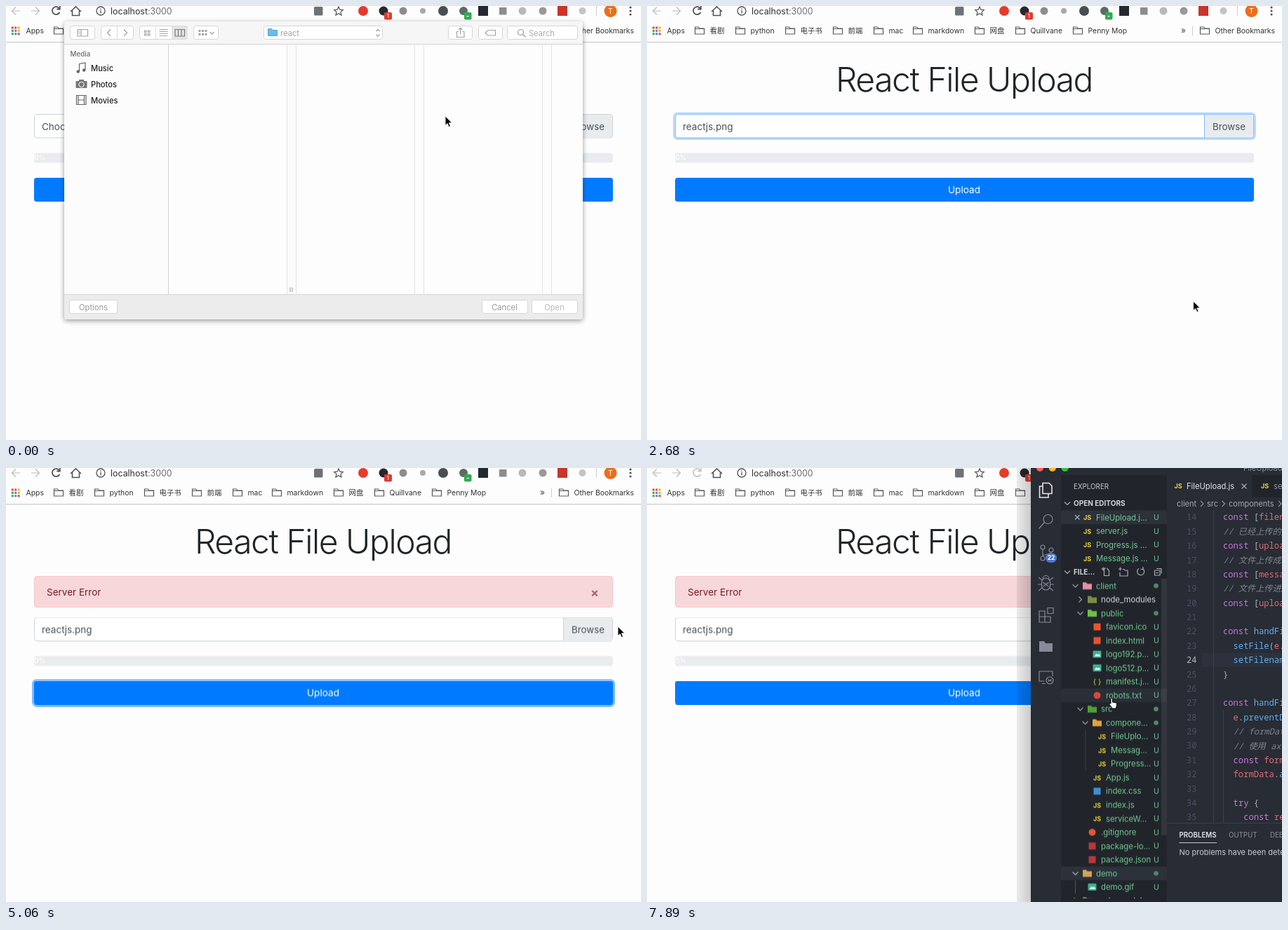
Animation of 905x619 px, one loop 8 s. Source, as an HTML page:

```html
<!DOCTYPE html>
<html lang="en">
<head>
<meta charset="utf-8">
<title>React File Upload</title>
<style>
html, body { margin: 0; width: 100%; height: 100%; overflow: hidden; background: #fdfdfd; }
svg { display: block; width: 100%; height: 100%; font-family: Inter, "Noto Sans CJK SC", "Noto Sans CJK", sans-serif; }
text { white-space: pre; }
.line { fill: none; stroke: currentColor; stroke-width: 1.2; }
.code { font-family: "Noto Sans Mono", "Noto Sans CJK SC", monospace; }
</style>
</head>
<body>
<svg viewBox="0 0 905 619" xmlns="http://www.w3.org/2000/svg"></svg>
<script>
const LOOP = 8000;
let css = '', count = 0;

// Timeline helpers: each returns a class attribute with its own stepped keyframes.
const track = frames => {
  const name = 'k' + count++;
  const body = frames.map(([t, rule]) => `${t / LOOP * 100}%{${rule}}`).join('');
  css += `@keyframes ${name}{${body}}.${name}{animation:${name} ${LOOP}ms step-end infinite}`;
  return `class="${name}"`;
};
const show = (...spans) => track([[0, 'opacity:0'],
  ...spans.flatMap(([a, b]) => b < LOOP ? [[a, 'opacity:1'], [b, 'opacity:0']] : [[a, 'opacity:1']])]);
const move = points => track(points.map(([t, x, y]) => [t, `transform:translate(${x}px,${y}px)`]));
const leg = (t0, t1, n, [x0, y0], [x1, y1]) => Array.from({ length: n }, (_, i) => {
  const u = (i + 1) / n, e = u * u * (3 - 2 * u);
  return [t0 + (t1 - t0) * i / (n - 1), x0 + (x1 - x0) * e, y0 + (y1 - y0) * e];
});

// Drawing helpers: text is placed by the middle of its capitals.
const g = (attr, ...kids) => `<g ${attr}>${kids.flat(9).join('')}</g>`;
const box = (x, y, w, h, fill, extra = '') => `<rect x="${x}" y="${y}" width="${w}" height="${h}" fill="${fill}" ${extra}/>`;
const dot = (x, y, r, fill, extra = '') => `<circle cx="${x}" cy="${y}" r="${r}" fill="${fill}" ${extra}/>`;
const line = (d, extra = '') => `<path class="line" d="${d}" ${extra}/>`;
const shape = (d, fill, extra = '') => `<path d="${d}" fill="${fill}" ${extra}/>`;
const text = (x, y, s, size, fill, extra = '') => `<text x="${x}" y="${y + size * .364}" font-size="${size}" fill="${fill}" ${extra}>${s}</text>`;
const MID = 'text-anchor="middle"', END = 'text-anchor="end"';
const MEDIUM = 'font-weight="500"', SEMI = 'font-weight="600"', BOLD = 'font-weight="700"';
const color = c => `color="${c}"`;
const folderPath = (x, y) => `M${x - 6.5} ${y - 5}h5l1.5 2h6.5v8h-13z`;

/* ---------- browser ---------- */
function browser() {
  const reload = 'M76 3.5A5.5 5.5 0 1 0 76.4 9M76.8 0v4.5h-4.5';
  const extensions = [[509, '#e53b2c', 7], [538, '#26282b', 6.5], [566, '#8c8c8c', 5.5], [594, '#a9a9a9', 4],
    [623, '#4a4d52', 7], [652, '#5a6c68', 6], [736, '#b9b9b9', 5.5], [765, '#999', 5.5], [821.5, '#c4c4c4', 5]];
  const marks = [[75, '看剧'], [133, 'python'], [204, '电子书'], [272, '前端'], [330, 'mac'], [386, 'markdown'],
    [474, '网盘'], [532, 'Quillvane'], [614, 'Penny Mop'], [795, 'Other Bookmarks']];
  const apps = ['#e5483a', '#e5483a', '#f2b01e', '#3aa757', '#4a86e8', '#f2b01e', '#3aa757', '#4a86e8', '#e5483a'];
  return [
    box(0, 0, 905, 619, '#fdfdfd'),
    box(0, 51, 905, 1.3, '#cdcdcd'),
    g(color('#bcbcbc'), line('M20 7H9M14 1.5L8.5 7L14 12.5M36 7h11M42 1.5L47.5 7L42 12.5', 'stroke-width="1.5"')),
    g(show([0, 300], [2680, 5500]), g(color('#505357'), line(reload, 'style="stroke-width:1.8"'))),
    g(show([300, 2680], [5500, LOOP]), g(color('#c6c6c6'), line(reload, 'style="stroke-width:1.8"'))),
    g(color('#505357'),
      line('M92 8L99.5 1L107 8M94.5 6.5V13.5H104.5V6.5', 'style="stroke-width:1.6"'),
      line('M141 7a6 6 0 1 1-12 0a6 6 0 1 1 12 0M135 6v4.5M135 3.5v1.4', 'style="stroke-width:1.3"'),
      line('M474 1l1.9 4.2l4.4.4l-3.3 3l1 4.4l-4-2.3l-4 2.3l1-4.4l-3.3-3l4.4-.4z')),
    `<text x="149" y="11.5" font-size="12.4" fill="#2e3134">localhost<tspan fill="#6b6e72">:3000</tspan></text>`,
    box(439, 1, 12.5, 12.5, '#6d7278', 'rx="1.5"'),
    extensions.map(([x, c, r]) => dot(x, 7, r, c)),
    box(539, 9, 11, 10.5, '#e0392e', 'rx="2"'), text(544.5, 14.3, '1', 8, '#fff', MID),
    box(653, 9, 10.5, 10.5, '#34a853', 'rx="2"'), box(656.5, 14, 3, 1.2, '#fff'),
    box(673, 0, 14, 14, '#24292e'), box(703, 2, 10.5, 10.5, '#8d8d8d'), box(786, 0, 14, 14, '#c7352b'),
    box(841, 0, 1, 14, '#d0d0d0'),
    dot(861.5, 7, 9, '#ef6c1a'), text(861.5, 7.3, 'T', 10.5, '#fff', MID),
    [2, 7, 12].map(y => dot(890, y, 1.6, '#505357')),
    apps.map((c, i) => box(7.8 + i % 3 * 4.4, 29.5 + (i / 3 | 0) * 4.4, 3, 3, c)),
    text(28.5, 35.5, 'Apps', 10.4, '#333'),
    marks.map(([x, s]) => [g(color('#55585c'), line(folderPath(x, 35) + `M${x - 6.5} 32.5h13`)),
      text(x + 14.5, 35.5, s, 10.4, '#333')]),
    text(761, 34.5, '»', 12, '#444'), box(777, 29, 1, 13, '#d0d0d0'),
  ];
}

/* ---------- upload page ---------- */
function page() {
  const ring = (y, h, o) => box(38.5, y, 828, h, 'none', `rx="5" stroke="#007bff" stroke-opacity="${o}" stroke-width="3"`);
  const field = stroke => [
    box(40.5, 154.5, 824, 33.5, '#fff', `rx="3.5" stroke="${stroke}"`),
    shape('M795 155h66a3 3 0 0 1 3 3v26.5a3 3 0 0 1-3 3h-66z', '#e9ecef'),
    box(794, 155, 1, 33, stroke)];
  return [
    text(452, 104.5, 'React File Upload', 48, '#212529', MID + ' font-weight="300" letter-spacing="-1.45"'),
    g(show([4160, LOOP]),
      box(40.5, 154.5, 824, 44, '#f8d7da', 'rx="3.5" stroke="#f5c6cb"'),
      text(58, 177.5, 'Server Error', 13.5, '#721c24'),
      g(color('#a3686f'), line('M835.3 175l7.4 7.4M842.7 175l-7.4 7.4', 'style="stroke-width:2.2"'))),
    g(move([[0, 0, 0], [4160, 0, 58.5]]),
      field('#ced4da'),
      g(show([2680, 4010]), ring(153, 36.5, .25), field('#80bdff')),
      g(show([0, 2680]), text(51, 172, 'Choose File', 13.5, '#495057')),
      g(show([2680, LOOP]), text(51, 172, 'reactjs.png', 13.5, '#495057')),
      text(829.5, 172, 'Browse', 13.3, '#495057', MID),
      box(40, 209.7, 825, 13.7, '#e9ecef', 'rx="3.5"'),
      text(40, 216.5, '0%', 10, '#fff', MEDIUM),
      g(show([4010, 5500]), ring(244, 36.5, .5)),
      box(40, 245, 825, 34, '#007bff', 'rx="3.5"'),
      g(show([3870, 4310]), box(40, 245, 825, 34, '#0069d9', 'rx="3.5"')),
      text(452, 262.5, 'Upload', 13.6, '#fff', MID)),
  ];
}

/* ---------- file dialog ---------- */
const button = (x, y, w, h, fill = '#fff') => box(x + .5, y + .5, w - 1, h - 1, fill, 'rx="3" stroke="#d6d6d6"');

function toolbar(ink, picked, pickedInk) {
  return g(color(ink),
    box(236, 28.5, 23, 19, picked, 'rx="2"'),
    line('M102 33.5h14.5v9.5h-14.5zM107 33.5v9.5M103.5 36h2M103.5 38.5h2'),
    [0, 1, 2, 3].map(i => line(`M${197.5 + i % 2 * 5} ${35 + (i >> 1) * 4.5}h2.5v2.5h-2.5z`)),
    line('M218.5 33.5h12M218.5 36.5h12M218.5 39.5h12M218.5 42.5h12'),
    g(color(pickedInk), line('M241 33.5h13.5v9.5h-13.5zM245.5 33.5v9.5M250 33.5v9.5')),
    [0, 1, 2, 3, 4, 5].map(i => box(274.5 + i % 3 * 4.5, 34 + (i / 3 | 0) * 5, 3, 3, ink)),
    line('M290.5 37l3 3l3-3M527.5 36l2.5-2.5l2.5 2.5M527.5 40.5l2.5 2.5l2.5-2.5', 'style="stroke-width:1.4"'),
    text(391, 38.5, 'react', 11.2, ink),
    line('M645 36.5h-2.5v8h10.5v-8h-2.5M647.7 40.5v-9M645 34l2.7-2.7l2.7 2.7'),
    line('M687 34.5h10.5v7.5h-10.5l-4-3.7z'));
}

const sideIcons = {
  file: 'M102 82h10l2 8v4h-14v-4zM100 90h14M103 85h8M102.5 87.5h9',
  cloud: 'M103 93a3 3 0 0 1-.5-6a4.5 4.5 0 0 1 8.5-1a3.5 3.5 0 0 1 1.5 7z',
  apps: 'M101 94l6.5-12l6.5 12M99.5 90.5h16',
  desk: 'M100 82.5h15v11h-15zM100 85h15',
  docs: 'M100 84h6v10h-6zM105 82h6l3 3v9h-8',
  laptop: 'M101.5 83.5h12v8h-12zM99.5 93.5h16',
};
const sideIcon = (name, y) => g(`transform="translate(0 ${y - 88})" ` + color('#666'), line(sideIcons[name]));

function sidebar() {
  const items = [[88, 'All My Files', 'file'], [111, 'Online Drive', 'cloud'], [134, 'Applications', 'apps'],
    [157.5, 'Desktop', 'desk'], [180.5, 'Documents', 'docs'], [203.5, 'Downloads'],
    [251.5, 'TaoMianLin的M...', 'laptop'], [274.5, 'Remote Disc']];
  const tags = [['红', '#f0544a'], ['橙', '#f5a13c'], ['黄', '#f7cf46'], ['绿', '#65cb4f'], ['蓝', '#34aadc']];
  const head = (y, s) => text(91.5, y, s, 9.8, '#737373', MEDIUM);
  return [
    box(84, 55, 147, 356, '#edeeef'),
    head(68.5, 'Favorites'), head(231.5, 'Devices'), head(303, 'Tags'),
    items.map(([y, s, icon]) => [icon ? sideIcon(icon, y) : '', text(121, y, s, 11.15, '#222', MEDIUM)]),
    dot(107.5, 203.5, 8, '#666'),
    g(color('#fff'), line('M107.5 199v8M104 204l3.5 3.5l3.5-3.5', 'style="stroke-width:1.8"')),
    dot(107.5, 274.5, 7.5, '#c4c4c4', 'stroke="#777"'), dot(107.5, 274.5, 3, '#eee', 'stroke="#777"'),
    tags.map(([s, c], i) => [dot(107.5, 322.5 + i * 23.1, 5.5, c), text(121, 322.5 + i * 23.1, s + '色', 11.3, '#222')]),
    box(221, 58, 7, 239, '#c0c1c2', 'rx="3.5"'),
  ];
}

function mediaList() {
  return [
    box(84, 55, 147, 356, '#fcfcfc'),
    text(91.5, 68.5, 'Media', 9.8, '#6a6a6a', MEDIUM),
    g(color('#666'),
      line('M104.5 93v-10.5l8.5-1.5v10'), dot(102.8, 93.5, 2.2, '#666'), dot(111.2, 91.5, 2.2, '#666'),
      box(99.5, 107, 16, 10, '#777', 'rx="1"'), box(104, 105, 7, 3, '#777'),
      dot(107.5, 112, 3.7, '#777', 'stroke="#fff"'),
      line('M100.5 127.5h13.5v13h-13.5zM103 127.5v13M111.5 127.5v13M103 134h8.5')),
    ['Music', 'Photos', 'Movies'].map((s, i) => text(121, 88.5 + i * 23, s, 11.15, '#222', MEDIUM)),
  ];
}

function preview() {
  const rows = [['', 'Portable Network Graphics image - 30 KB'], ['Created'], ['Modified'], ['Last opened'],
    ['Dimensions', '1200 × 630'], ['', 'Add Tags…']];
  const ink = ['#8f8f8f', '#111', '#111', '#111', '#111', '#1f7df0'];
  return [
    box(414, 55, 407, 356, '#fdfdfd'),
    box(457, 64, 321, 168.5, '#222'), dot(617.5, 147, 42, '#61dafb'),
    text(617.5, 252.5, 'reactjs.png', 14.1, '#111', MID + ' ' + MEDIUM),
    rows.map(([k, v = 'Saturday, 10 August 2019 at 2:10 pm'], i) => {
      const y = 287.5 + i * 15.3;
      return [text(575, y, k, 10.6, '#8a8a8a', END + ' ' + MEDIUM), text(582, y, v, 10.6, ink[i], i ? MEDIUM : SEMI)];
    }),
  ];
}

function dialog() {
  const files = ['download', 'J1Oioug', 'r', 'react_cool', 'react_hooks', 'react_hooks2', 'react_native', 'react', 'reactjs'];
  const thumb = { J1Oioug: '#7d8287', r: '#244a73' };
  const row = (s, i, ink) => [
    box(239.5, 60.5 + i * 16, 9.5, 6.5, thumb[s] || '#222', 'stroke="#b5b5b5"'),
    text(256, 64 + i * 16, s + '.png', 10.6, ink, MEDIUM)];
  const vline = x => box(x, 55, 1, 356, '#e4e4e4');
  const label = (x, s, ink) => text(x, 429.5, s, 11.2, ink, MID);
  const foot = ink => [label(124.5, 'Options', ink), label(710.5, 'Cancel', ink)];
  return g(show([0, 2530]),
    box(83, 22, 739, 425, '#fdfdfd', 'rx="4" style="filter:drop-shadow(0 2px 3.5px rgba(0,0,0,.4))"'),
    box(83, 22, 739, 33, '#f6f6f6', 'rx="4"'), box(83, 54, 739, 1, '#d3d3d3'),
    [[91, 36], [135, 47], [190, 69], [267, 36], [367, 170], [630, 35], [673, 35], [714, 101]].map(([x, w]) => button(x, 28, w, 20)),
    [158, 213, 236].map(x => box(x, 29, 1, 18, '#dcdcdc')),
    g(color('#999'), line('M149 33.5l-4.5 4.7l4.5 4.7M168 33.5l4.5 4.7l-4.5 4.7'),
      line('M737.5 37.5a4 4 0 1 1-8 0a4 4 0 1 1 8 0M736.5 40.5l4 4')),
    text(745, 38.5, 'Search', 11.1, '#aaa'),
    shape(folderPath(380, 37.5) + 'z', '#6bbcec', 'stroke="#4ea5da"'),
    g(show([0, 300]), toolbar('#a3a3a3', '#e4e4e4', '#777')),
    g(show([300, 2530]), toolbar('#4c4c4c', '#6b6b6b', '#fff')),
    box(401, 55, 12, 356, '#fbfbfb'), vline(400), vline(413),
    [582, 595, 764, 777].map(vline),
    box(404.5, 401.5, 1, 6.5, '#999'), box(407.5, 401.5, 1, 6.5, '#999'),
    g(show([0, 150]), mediaList()),
    g(show([150, 2530]), sidebar()),
    box(231, 55, 1, 356, '#d2d2d2'),
    g(show([300, 2530]), files.map((s, i) => row(s, i, '#222'))),
    g(show([1050, 2530]), box(232, 184, 168, 15, '#0464d9'), row('reactjs', 8, '#fff')),
    g(show([1200, 2530]), preview()),
    shape('M83 411h739v32a4 4 0 0 1-4 4h-731a4 4 0 0 1-4-4z', '#ececec'), box(83, 411, 739, 1, '#d6d6d6'),
    button(90, 419, 69, 20), button(678, 419, 66, 20), button(749, 419, 66, 20),
    g(show([0, 300]), foot('#999')), g(show([300, 2530]), foot('#2c2c2c')),
    g(show([0, 1050]), label(781.5, 'Open', '#bbb')),
    g(show([2390, 2530]), button(749, 419, 66, 20, '#e2e2e2')),
    g(show([1050, 2530]), label(781.5, 'Open', '#2c2c2c')));
}

/* ---------- editor ---------- */
const GREEN = '#73c991';
const js = (x, y) => text(x, y + .5, 'JS', 9, '#f0d13a', MID + ' ' + BOLD);
const chevron = (x, y, open) => line(open ? `M${x - 4} ${y - 2}l4 4l4-4` : `M${x - 2} ${y - 4}l4 4l-4 4`);

function fileIcon(kind, x, y) {
  if (kind === 'js') return js(x, y);
  if (kind === '{}') return text(x, y, '{ }', 10, '#f0d13a', MID);
  if (kind === 'img') return box(x - 6, y - 5, 12, 10, '#3fae8f', 'rx="1"') + shape(`M${x - 4} ${y + 3}l3-4l2 2l1.5-2l2.5 4z`, '#e8fff6');
  if (kind[0] === '/') return shape(folderPath(x, y), kind.slice(1));
  return kind[0] === 'o' ? dot(x, y, 5, kind.slice(1)) : box(x - 5, y - 5, 10, 10, kind);
}

function tree() {
  const git = 'o#e2573a', npm = '#b5393a';
  const rows = [[0, 'client', '/#e58fa0', 1], [1, 'node_modules', '/#7d8c46', 0], [1, 'public', '/#6fbf4b', 1],
    [2, 'favicon.ico', '#e8562a'], [2, 'index.html', '#e5532d'], [2, 'logo192.p...', 'img'], [2, 'logo512.p...', 'img'],
    [2, 'manifest.j...', '{}'], [2, 'robots.txt', 'o#d4493f'], [1, 'src', '/#4f9e3a', 1], [2, 'compone...', '/#e2a33c', 1],
    [3, 'FileUplo...', 'js'], [3, 'Messag...', 'js'], [3, 'Progress...', 'js'], [2, 'App.js', 'js'], [2, 'index.css', '#3f8fd2'],
    [2, 'index.js', 'js'], [2, 'serviceW...', 'js'], [1, '.gitignore', git], [1, 'package-lo...', npm], [1, 'package.json', npm],
    [0, 'demo', '/#d7a35a', 1], [1, 'demo.gif', 'img'], [0, 'node_modules', '/#7d8c46', 0], [0, '.gitignore', git],
    [0, 'package-loc...', npm], [0, 'package.json', npm], [0, 'README.md', '#3f4d5c']];
  const at = i => 168 + i * 19.53;
  return [
    box(590, at(21) - 9.8, 151, 19.5, '#2c313a'),
    g(show([7740, LOOP]), box(590, at(8) - 9.8, 151, 19.5, '#2a2e37')),
    box(610, at(22) - 9.8, 1, 19.5, '#4b5261'), box(624.5, at(11) - 9.8, 1, 58.5, '#3b414c'),
    rows.map(([level, name, icon, open], i) => {
      const x = 640 + level * 7, y = at(i), plain = name === 'node_modules', folder = open !== undefined;
      return [folder ? chevron(x - 29.5, y, open) : '', fileIcon(icon, x - 12.5, y),
        text(x, y, name, 11.3, plain ? '#d7dae0' : GREEN),
        plain ? '' : folder ? dot(725.5, y, 3.3, '#4d8a66') : text(726, y, 'U', 10.5, GREEN, MID)];
    }),
  ];
}

function code() {
  const ink = { p: '#c678dd', w: '#abb2bf', r: '#e06c75', b: '#61afef', c: '#7f848e' };
  const lines = ['p:const |w:[|r:filename', 'c:// 已经上传的文件', 'p:const |w:[|r:uploaded', 'c:// 文件上传成功', 'p:const |w:[|r:message',
    'c:// 文件上传进度', 'p:const |w:[|r:uploadP', '', 'p:const |b:handFile', 'b:  setFile|w:(|r:e|w:.', 'b:  setFilename', 'w:}', '',
    'p:const |b:handFile', 'r:  e|w:.|b:preventD', 'c:  // formData', 'c:  // 使用 axios', 'p:  const |r:formData', 'r:  formData|w:.|b:append',
    '', 'p:  try |w:{', 'p:    const |r:res'];
  const at = n => 70 + (n - 14) * 20.38;
  const number = (n, c) => text(783.5, at(n), n, 12, c, END + ' class="code"');
  const current = (n, from, to) => g(show([from, to]), box(791, at(n) - 10, 114, 20, '#2c313c'), number(n, '#abb2bf'));
  return [
    lines.map((s, i) => number(14 + i, '#495162')),
    current(33, 5500, 6100), current(24, 6100, LOOP),
    box(807, 60, 1, 447, '#3b4048'), box(821, at(28) - 10, 1, 163, '#3b4048'),
    g(show([5500, 5800]), box(865, at(22) - 10, 40, 20, '#3a404c')),
    lines.map((s, i) => s &&
      text(821, at(14 + i), s.split('|').map(t => `<tspan fill="${ink[t[0]]}">${t.slice(2)}</tspan>`).join(''),
        12.15, '#abb2bf', `class="code" ${s[0] === 'c' ? 'font-style="italic"' : ''}`)),
    g(show([5500, 5800]), box(865.5, 200.5, 45, 20, '#21252b', 'stroke="#181a1f"'),
      text(873, 210, 'const', 12.15, '#8c5a9c', 'class="code"')),
  ];
}

function activityBar() {
  return [
    g(color('#e2e5ea'), line('M564 21.5h9l4 4v11h-13zM564 26h-4.5v16h12.5v-5.5', 'style="stroke-width:1.6"')),
    g(color('#858b97'),
      line('M578 73a6.5 6.5 0 1 1-13 0a6.5 6.5 0 1 1 13 0M566.5 77.5l-8 9'),
      line('M567 113a3 3 0 1 1-6 0a3 3 0 1 1 6 0M567 129a3 3 0 1 1-6 0a3 3 0 1 1 6 0M579 117a3 3 0 1 1-6 0a3 3 0 1 1 6 0M564 116v10M576 120c0 4-12 2-12 6'),
      line('M562.5 163a6 6 0 0 1 12 0v5a6 6 0 0 1-12 0zM564 158a4.5 4.5 0 0 1 9 0M558 156l5 4M579 156l-5 4M557 166h5M575 166h5M558 175l5-4M579 175l-5-4M564.5 163l8 6M572.5 163l-8 6'),
      line('M559 204h8v16h-8zM559 212h16v8h-16zM571 199.5h8v8h-8z'),
      shape('M559 247h7l2 3h10v12h-19z', '#858b97'),
      line('M566 304h-7v-14h19v7M563 307.5h5M579 303a5 5 0 1 1-10 0a5 5 0 1 1 10 0M571.5 301.5l2 1.5l-2 1.5M576.5 301.5l-2 1.5l2 1.5')),
    box(568, 121.5, 16, 13.5, '#4d78cc', 'rx="6.7"'), text(576, 128.3, '22', 8.5, '#fff', MID + ' ' + BOLD),
  ];
}

function editor() {
  const openFiles = ['FileUpload.j...', 'server.js', 'Progress.js ...', 'Message.js ...'];
  const head = (y, s) => text(608, y, s, 10, '#d0d4dc', BOLD);
  return g(show([5500, LOOP]),
    box(527, 0, 20, 619, 'url(#shade)'),
    box(547, 0, 358, 619, '#282c34'),
    box(590, 10, 151, 609, '#21252b'), box(741, 10, 164, 32, '#21252b'), box(741, 10, 121, 32, '#282c34'),
    ['#ff5f57', '#febc2e', '#28c840'].map((c, i) => dot(560 + i * 17.8, 0, 5, c)),
    text(850, 0, 'FileUpload.js', 11, '#8b919d'),
    activityBar(),
    text(608, 26, 'EXPLORER', 9.8, '#c3c8d1'),
    box(590, 60.5, 151, 19.5, '#2c313a'),
    g(color('#a4abb8'),
      chevron(599, 50.5, true), head(50.5, 'OPEN EDITORS'),
      line('M610 67l6.5 6.5M616.5 67l-6.5 6.5'),
      openFiles.map((s, i) => [js(627.5, 70.5 + i * 19.53), text(640, 70.5 + i * 19.53, s, 11.3, GREEN),
        text(726, 70.5 + i * 19.53, 'U', 10.5, GREEN, MID)]),
      g('clip-path="url(#pane)"', g(move([[0, 0, -91.6], ...leg(6690, 7440, 6, [0, -91.6], [0, 0])]), tree())),
      g(show([6390, LOOP]), box(733, 158, 8, 366, '#fff', 'fill-opacity=".08"')),
      box(590, 138.5, 151, 19.5, '#21252b'), chevron(599, 148.5, true),
      g(show([5500, 6390]), head(148.5, 'FILE-UPLOAD-HOOKS')),
      g(show([6390, LOOP]), head(148.5, 'FILE...'),
        line('M654 143h-2.5v10.5h7v-7l-3-3.5M647.5 144h5M650 141.5v5'),
        line('M678 144.5h2l1 1.5h4v8h-11v-5M672 144h5M674.5 141.5v5'),
        line('M707 144a5 5 0 1 1-6-.5M707 141v3.5h-3.5'),
        line('M726 143.5h7v7M723.5 146h7.5v7h-7.5zM725 149.5h4'))),
    js(757, 25.5), text(769, 26, 'FileUpload.js', 11.2, '#dfe2e8'),
    g(color('#a4abb8'), line('M847.5 22.5l7 7M854.5 22.5l-7 7')),
    js(880.5, 25.5), text(893, 26, 'server.js', 11.2, '#8b919d'),
    ['client', 'src', 'components'].map((s, i) => text([755, 798, 829][i], 51, s, 11, '#a0a7b4')),
    g(color('#8b919d'), [791, 821.5, 902].map(x => chevron(x, 51, false))),
    code(),
    box(741, 507, 164, 112, '#282c34'), box(741, 506, 164, 1, '#3a3f4a'),
    text(758.5, 523.5, 'PROBLEMS', 9.7, '#e4e7ec', SEMI), box(758.5, 534, 53.5, 1, '#c3c8d1'),
    text(829, 523.5, 'OUTPUT', 9.7, '#8b919d'), text(888, 523.5, 'DEBUG CONSOLE', 9.7, '#8b919d'),
    text(758.5, 547.5, 'No problems have been detected', 11, '#c8ccd4'));
}

/* ---------- pointer ---------- */
function pointer() {
  const start = [626, 157], file = [312, 193], pick = [306, 190], open = [785, 427], rest = [723, 369], upload = [456, 261];
  const path = [[0, ...start], ...leg(150, 750, 5, start, file), [1050, ...pick], ...leg(1500, 2250, 6, pick, open),
    ...leg(2680, 3270, 5, open, rest), ...leg(3570, 4010, 4, rest, upload), ...leg(4610, 5060, 4, upload, [872, 226]),
    [6390, 718, 246], [6540, 690, 238], [7740, 676, 285], [7890, 658, 328]];
  return g(move(path),
    g(show([0, 5500]), shape('M0 0V13.5L3.1 10.6L5.2 15.5L7.5 14.5L5.4 9.8H9.7Z', '#000', 'stroke="#fff" stroke-width=".9"')),
    g(show([6390, LOOP]), shape('M3 8V1.8a1.2 1.2 0 0 1 2.5 0V6l1.8.2l1.7.4l1.5.5q1 .4 1 1.5v2.4l-1 2.5v1.5h-6v-1.5L1.2 9.5Q.5 8 1.8 7.5z', '#fff', 'stroke="#000"')));
}

const defs = `<defs>
  <linearGradient id="shade"><stop offset="0" stop-opacity=".07"/><stop offset="1" stop-opacity=".2"/></linearGradient>
  <clipPath id="pane"><rect x="590" y="158" width="151" height="456"/></clipPath></defs>`;
const scene = [defs, browser(), page(), dialog(), editor(), pointer()].flat(9).join('');
document.head.appendChild(document.createElement('style')).textContent = css;
document.querySelector('svg').innerHTML = scene;
</script>
</body>
</html>
```
